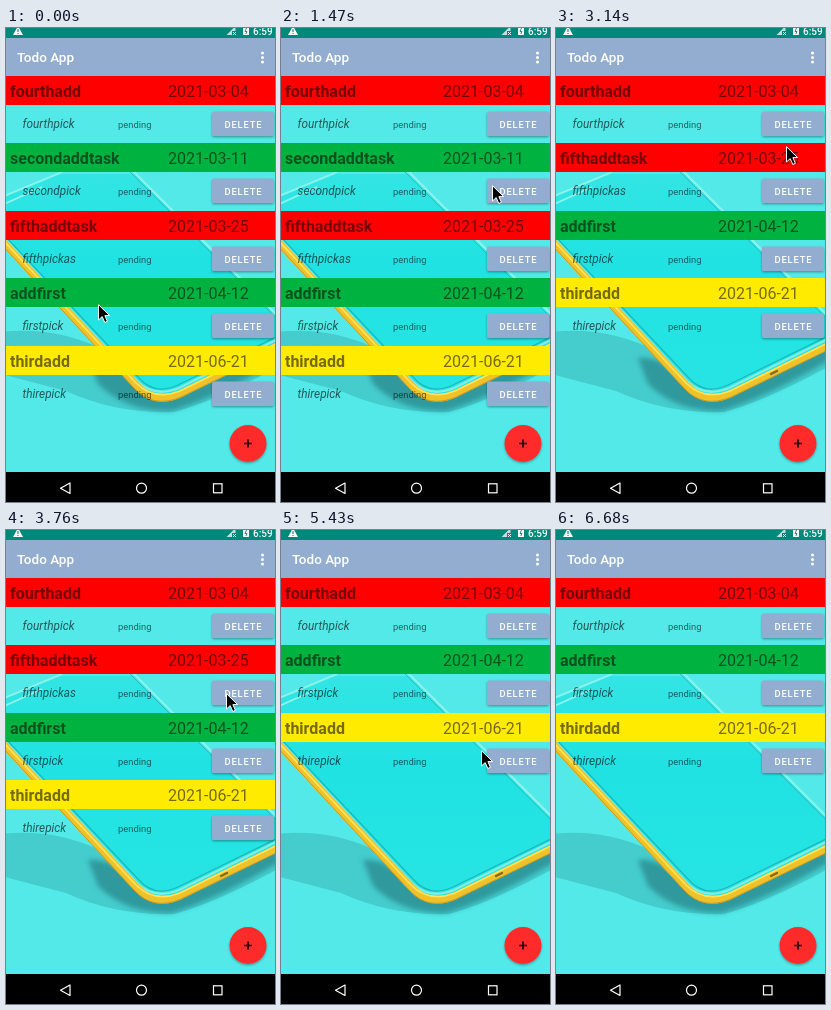
Animation, 269 px wide and 474 px high, one loop 7100 ms. Source, as an HTML page:

```html
<!DOCTYPE html>
<html lang="en">
<head>
<meta charset="utf-8">
<title>Todo App</title>
<style>
  html, body { margin: 0; width: 100%; height: 100%; overflow: hidden; background: #52e9e8; }
  svg { display: block; width: 269px; height: 474px; font-family: Roboto, sans-serif; }
  .row text { fill: #000; fill-opacity: .54; }
  .row .title { font-weight: 700; font-size: 16px; }
  .row .date { font-size: 16px; }
  .row .note { font-style: italic; font-size: 11.8px; fill-opacity: .62; }
  .row .state { font-size: 9.4px; fill-opacity: .58; }
  .row .label { font-weight: 500; font-size: 9.4px; letter-spacing: .84px; fill: #fff; fill-opacity: 1; }

  /* Everything jumps; positions hold between steps. */
  .row, #cursor { animation: 7100ms step-end infinite; }
  .row { transform: translateY(var(--a)); animation-name: list; }
  @keyframes list {
    0%      { transform: translateY(var(--a)); }
    35.49%  { transform: translateY(var(--b)); }
    61.83%, 100% { transform: translateY(var(--c)); }
  }
  #cursor { animation-name: point; }
  @keyframes point {
    0%     { transform: translate(92px, 276px); }
    2.95%  { transform: translate(81px, 379px); }
    5.91%  { transform: translate(64px, 387px); }
    8.87%  { transform: translate(96px, 387px); }
    11.83% { transform: translate(99px, 387px); }
    14.78% { transform: translate(237px, 254px); }
    17.74% { transform: translate(247px, 196px); }
    20.7%  { transform: translate(211px, 157px); }
    44.22% { transform: translate(230px, 118px); }
    47.18% { transform: translate(218px, 115px); }
    49.99% { transform: translate(213px, 157px); }
    52.95% { transform: translate(220px, 163px); }
    70.7%  { transform: translate(-40px, 0); }
    73.66% { transform: translate(144px, 91px); }
    76.47% { transform: translate(200px, 220px); }
    79.43% { transform: translate(163px, 302px); }
    82.39% { transform: translate(198px, 336px); }
    85.35% { transform: translate(199px, 336px); }
    88.3%  { transform: translate(182px, 409px); }
    91.26% { transform: translate(203px, 460px); }
    94.08%, 100% { transform: translate(-40px, 0); }
  }
</style>
</head>
<body>
<svg viewBox="0 0 269 474">
  <defs>
    <linearGradient id="glass" x1="0" y1="0" x2="0" y2="1">
      <stop offset="0" stop-color="#33e5e4"/>
      <stop offset=".4" stop-color="#20e2e2"/>
      <stop offset="1" stop-color="#27e4e4"/>
    </linearGradient>
    <filter id="soft" x="-20%" y="-40%" width="140%" height="180%"><feGaussianBlur stdDeviation="2.5"/></filter>
    <filter id="drop" x="-30%" y="-30%" width="160%" height="170%">
      <feDropShadow dx="0" dy="1.2" stdDeviation="1" flood-opacity=".35"/>
    </filter>
    <clipPath id="page"><path d="M0 48H269V445H0Z"/></clipPath>
  </defs>

  <rect width="269" height="474" fill="#52e9e8"/>
  <g clip-path="url(#page)" fill="none">
    <!-- shadows under the phone -->
    <path d="M-5 304Q45 298 92 319L150 372L272 316V339Q205 375 168 384Q110 386 60 363Q25 354 -5 346Z" fill="#45cccd"/>
    <path d="M82 330Q104 328 126 350L152 370L272 314V333Q205 372 165 383Q120 384 92 356Z" fill="#2a8d92" opacity=".8" filter="url(#soft)"/>
    <!-- phone -->
    <path d="M-4 170L55 146H128L269 287L274 316L176 364Q150 378 133 359L-4 214Z" fill="url(#glass)"/>
    <path d="M-4 169L56 144M-4 177L36 159" stroke="#8df4ea" stroke-width="1.8"/>
    <path d="M127 143L272 288" stroke="#8df4ea" stroke-width="2"/>
    <path d="M123 143L272 292" stroke="#2bbfc3" stroke-width="1"/>
    <path d="M-3 206L132 349Q148 368 172 357L272 308" stroke="#17b9bd" stroke-width="1.2"/>
    <path d="M-3 209L131 353Q148 370 173 360L272 311" stroke="#85ece0" stroke-width="2.4"/>
    <path d="M-3 214L130 357Q148 377 174 366L272 318" stroke="#f0c22a" stroke-width="7.4"/>
    <path d="M-3 212L130 355Q148 373 174 363L272 315" stroke="#ffe45a" stroke-width="1.6"/>
    <path d="M-3 218L128 360Q147 381 175 369L272 322" stroke="#c39b29" stroke-width="1"/>
    <path d="M215 346L221 343" stroke="#856a20" stroke-width="2.4" stroke-linecap="round"/>
  </g>

  <g id="rows"></g>

  <!-- app bar -->
  <rect y="10" width="269" height="38" fill="#92add0"/>
  <text x="11" y="34" font-size="13.5" font-weight="500" fill="#fff">Todo App</text>
  <g fill="#fff">
    <circle cx="256.5" cy="25" r="1.5"/><circle cx="256.5" cy="29.5" r="1.5"/><circle cx="256.5" cy="34" r="1.5"/>
  </g>

  <!-- status bar -->
  <rect width="269" height="10" fill="#00897b"/>
  <g fill="#fff">
    <path d="M12 -2L17 7H7Z"/>
    <path d="M220.5 7L229.5 -2V3H226V7Z" opacity=".75"/>
    <rect x="237" y="-1" width="6" height="8" rx=".7"/>
    <text x="247" y="6.5" font-size="10" font-weight="500">6:59</text>
  </g>
  <path d="M227 4L230 7M230 4L227 7" stroke="#fff" stroke-width=".9"/>
  <path d="M12 1V4M12 5V6" stroke="#00897b" stroke-width="1.1"/>
  <path d="M240.5 0L239 3.5H241L239.8 6" fill="none" stroke="#00897b" stroke-width=".9"/>

  <!-- add button -->
  <circle cx="242" cy="415.5" r="18.5" fill="#ff2b2b" filter="url(#drop)"/>
  <path d="M238 415.5H246M242 411.5V419.5" stroke="#1a0505" stroke-width="1.7"/>

  <!-- navigation bar -->
  <rect y="444" width="269" height="30" fill="#000"/>
  <g fill="none" stroke="#fff" stroke-width="1.2">
    <path d="M64 455V465.5L54.5 460.2Z" stroke-linejoin="round"/>
    <circle cx="135.5" cy="460.2" r="5"/>
    <rect x="207.5" y="455.8" width="8.5" height="9"/>
  </g>

  <g id="cursor">
    <path d="M.5 .7V16L4.2 12.6L6.8 18.5L9.4 17.3L6.9 11.6H11.6Z" fill="#000" stroke="#fff" stroke-width="1"/>
  </g>
</svg>
<script>
  const red = '#fe0000', green = '#00b341', yellow = '#ffeb00';
  const slots = [48, 115, 183, 250, 318];
  // The last three values are list slots before and after each deletion; -1 is gone.
  const tasks = [
    ['fourthadd', '2021-03-04', 'fourthpick', red, 0, 0, 0],
    ['secondaddtask', '2021-03-11', 'secondpick', green, 1, -1, -1],
    ['fifthaddtask', '2021-03-25', 'fifthpickas', red, 2, 1, -1],
    ['addfirst', '2021-04-12', 'firstpick', green, 3, 2, 1],
    ['thirdadd', '2021-06-21', 'thirepick', yellow, 4, 3, 2]
  ];
  const slotY = slot => (slots[slot] ?? -200) + 'px';

  document.getElementById('rows').innerHTML = tasks.map(([title, date, note, color, a, b, c]) => `
    <g class="row" style="--a:${slotY(a)};--b:${slotY(b)};--c:${slotY(c)}">
      <rect width="269" height="29" fill="${color}"/>
      <text class="title" x="4" y="20.5">${title}</text>
      <text class="date" x="162" y="20.5">${date}</text>
      <text class="note" x="16.5" y="52">${note}</text>
      <text class="state" x="112" y="52">pending</text>
      <rect x="206" y="35.5" width="62" height="24.5" rx="2" fill="#92add0" filter="url(#drop)"/>
      <text class="label" x="218.5" y="51.5">DELETE</text>
    </g>`).join('');
</script>
</body>
</html>
```
